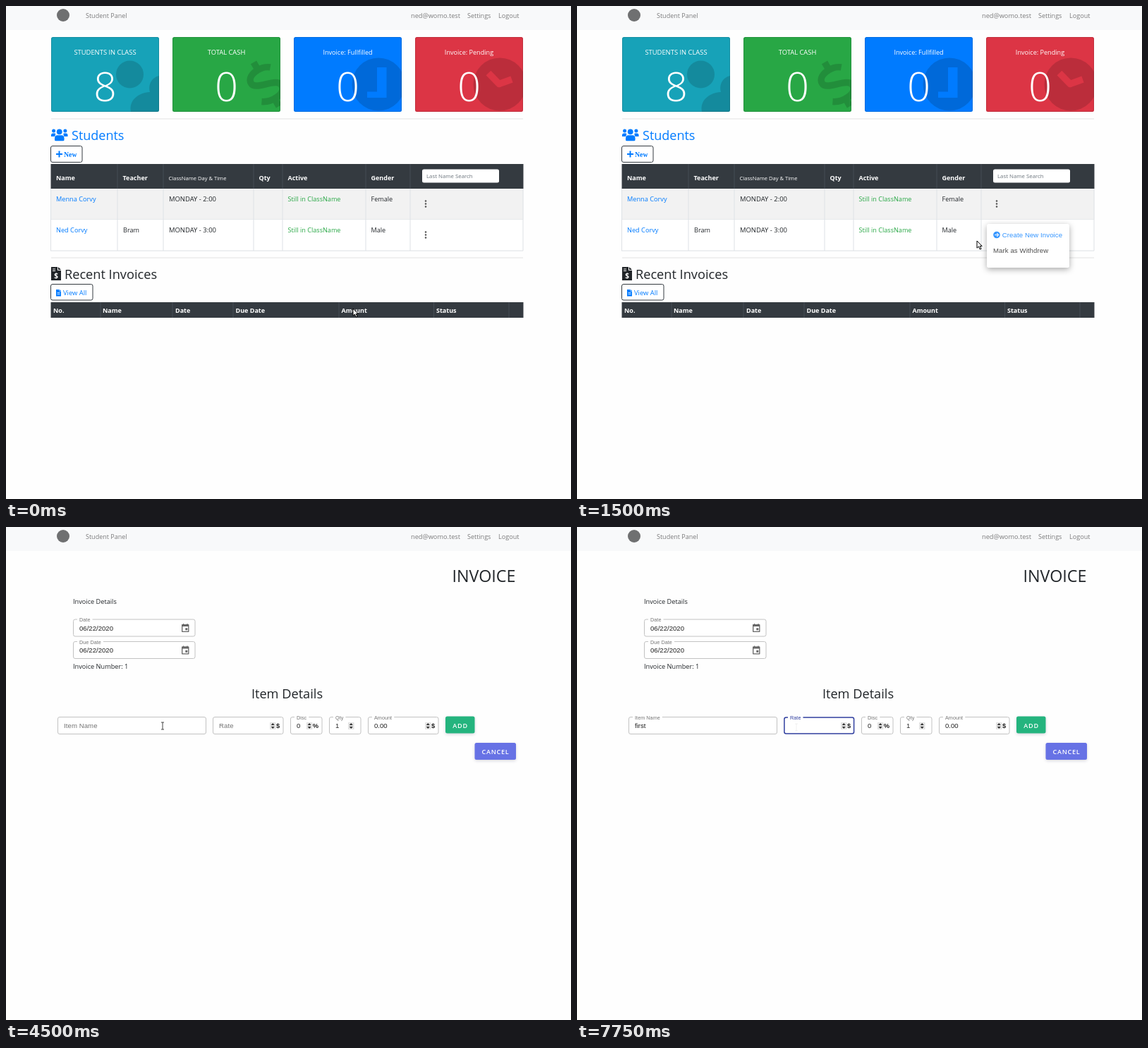
Write an HTML page with a canvas that moves like this. It is 801 px wide and 699 px high and loops after 8 s.

```html
<!DOCTYPE html>
<html lang="en">
<head>
<meta charset="utf-8">
<title>Student Panel</title>
<style>
html, body { margin: 0; width: 100%; height: 100%; overflow: hidden; background: #fff; }
canvas { display: block; width: 801px; height: 699px; }
</style>
</head>
<body>
<canvas id="stage" width="801" height="699"></canvas>
<script>
const ctx = document.getElementById('stage').getContext('2d');
const LOOP = 8000, STEP = 250;
const UI = '"Open Sans", "Noto Sans", sans-serif';
const ARIAL = '"Liberation Sans", Arial, sans-serif';
const SERIF = '"Liberation Serif", Times, serif';
const BLUE = '#007bff', DARK = '#343a40', INK = '#212529', GREEN = '#28a745', INDIGO = '#303f9f';

// [ms, x, y, shape]; each pose holds until the next one
const POINTER = [
  [0, 492, 429, 'arrow'], [250, 536, 376, 'arrow'], [500, 563, 327, 'arrow'],
  [750, 583, 324, 'arrow'], [1000, 594, 323, 'hand'], [1500, 567, 333, 'arrow'],
  [1750, 553, 350, 'arrow'], [2000, 546, 366, 'arrow'], [2250, 600, 352, 'arrow'],
  [2500, 640, 340, 'hand'], [2750, 644, 326, 'hand'], [3750, 440, 336, 'arrow'],
  [4000, 372, 312, 'arrow'], [4250, 278, 288, 'beam'], [4500, 222, 282, 'beam'],
  [4750, 222, 282, 'faint'], [6250, 262, 304, 'arrow'], [6500, 372, 316, 'arrow'],
  [6750, 449, 322, 'arrow'], [7000, 345, 290, 'beam'], [7250, 311, 284, 'faint']
];
const TYPED = [[5250, 'f'], [5500, 'fi'], [5750, 'firs'], [6000, 'first']];

const latest = (list, t) => list.filter(k => k[0] <= t).pop();

function text(s, x, y, size, color, { weight = 400, font = UI, align = 'left', gap = 0 } = {}) {
  ctx.font = `${weight} ${size}px ${font}`;
  ctx.textAlign = align;
  ctx.letterSpacing = gap + 'px';
  ctx.fillStyle = color;
  ctx.fillText(s, x, y);
  return ctx.measureText(s).width;
}
function rect(x, y, w, h, color) {
  ctx.fillStyle = color;
  ctx.fillRect(x, y, w, h);
}
function roundRect(x, y, w, h, r, fill, stroke, width = 1) {
  ctx.beginPath();
  ctx.roundRect(x, y, w, h, r);
  if (fill) { ctx.fillStyle = fill; ctx.fill(); }
  if (stroke) { ctx.strokeStyle = stroke; ctx.lineWidth = width; ctx.stroke(); }
}
function disc(x, y, r, color) {
  ctx.beginPath();
  ctx.arc(x, y, r, 0, 7);
  ctx.fillStyle = color;
  ctx.fill();
}
function shape(d, fill, stroke, width = 1) {
  const p = new Path2D(d);
  if (fill) { ctx.fillStyle = fill; ctx.fill(p); }
  if (stroke) { ctx.strokeStyle = stroke; ctx.lineWidth = width; ctx.stroke(p); }
}
function shadowed(color, blur, dy, draw) {
  ctx.save();
  ctx.shadowColor = color;
  ctx.shadowBlur = blur;
  ctx.shadowOffsetY = dy;
  draw();
  ctx.restore();
}

function nav() {
  rect(0, 0, 801, 34, '#f8f9fa');
  disc(81, 13, 9, '#6f7071');
  const grey = '#7c7c7d';
  text('Student Panel', 113, 17, 9, grey);
  text('ned@womo.test', 574, 17, 9.2, grey);
  text('Settings', 654, 17, 9, grey);
  text('Logout', 698, 17, 9.1, grey);
}

const SHADE = 'rgba(0,0,0,.15)';
const cardArt = [
  () => {
    disc(175.5, 97, 19.5, SHADE);
    shape('M217 99C207 101 201 111 204 122C187 123 174 134 177 150H217Z', SHADE);
  },
  () => {
    ctx.translate(369, 111);
    ctx.rotate(-Math.PI / 6);
    shape('M17-18C6-27-18-25-18-12C-18 1 18-2 18 12C18 26-6 26-18 18M0-36V-22M0 22V36', null, SHADE, 9.5);
  },
  color => {
    disc(528, 111, 37.5, SHADE);
    shape('M526 87H539.5V130H512V121.5H526Z', color);
  },
  color => {
    disc(700, 111, 37.5, SHADE);
    ctx.lineJoin = 'round';
    shape('M684 95L699 110.5L717 104', null, color, 9.5);
  }
];
function card(i, title, value, color, size) {
  const x = 64 + 172 * i;
  roundRect(x, 44, 153, 106, 2.5, color);
  ctx.save();
  ctx.clip();
  cardArt[i](color);
  ctx.restore();
  roundRect(x + .5, 44.5, 152, 105, 2.5, null, 'rgba(0,0,0,.12)');
  text(title, x + 76.5, 68.5, size, '#fff', { align: 'center' });
  text(value, x + 76.5, 135, 57, '#fff', { align: 'center', weight: 300 });
}

function usersIcon() {
  for (const x of [67.6, 83.9]) disc(x, 177, 2.5, BLUE);
  disc(75.7, 178.3, 3.9, BLUE);
  shape('M64 185V183Q64 180.5 66.5 180.5H69.5Q71 181 69 185ZM87.5 185V183Q87.5 180.5 85 180.5H82Q80.5 181 82.5 185Z', BLUE);
  roundRect(69, 183.3, 13.5, 8, [4, 4, 1.5, 1.5], BLUE);
}
function billIcon() {
  shape('M64 370H73V375H78V389H64ZM74 370L78 374H74Z', INK);
  rect(66, 372.5, 4, 1, '#fff');
  rect(66, 375, 4, 1, '#fff');
  text('$', 71, 386, 10, '#fff', { weight: 700, align: 'center' });
}
function fileIcon() {
  shape('M71 402H75.5V404.5H78V411.5H71ZM76 402L78 404H76Z', BLUE);
  for (const y of [406, 408]) rect(72.5, y, 4, .8, '#fff');
}

const HEAD = { weight: 700 };
function headRow(y, h, base, labels, lines) {
  rect(63.5, y, 670, h, DARK);
  for (const x of lines) rect(x, y, 1, h, '#454d55');
  for (const [s, x] of labels) text(s, x, base, 9, '#fff', HEAD);
}
const COLS = [157.5, 222.5, 350.5, 391.5, 509.5, 572.5];
function studentRow(y, bg, name, teacher, slot, gender) {
  rect(63.5, y, 670, 44, bg);
  for (const x of [63, ...COLS, 732.5]) rect(x, y, 1, 44, '#dee2e6');
  rect(63, y + 43.5, 670, 1, '#dee2e6');
  const b = y + 18;
  text(name, 71, b, 9.2, BLUE);
  text(teacher, 166, b, 9.1, INK);
  text(slot, 231, b, 9.45, INK);
  text('Still in ClassName', 399.5, b, 9.1, GREEN);
  text(gender, 517.5, b, 9.1, INK);
  for (const d of [-4, 0, 4]) disc(595, y + 21.5 + d, 1.25, '#555');
}

function menu(alpha, hover) {
  ctx.save();
  shadowed(`rgba(0,0,0,${.42 * alpha})`, 8, 2.5, () => roundRect(581, 309, 117, 62, 2.5, '#fff'));
  ctx.globalAlpha = alpha;
  const link = hover ? '#0056b3' : BLUE;
  const opt = { font: ARIAL, gap: .09 };
  disc(595, 324.5, 4.8, link);
  shape('M592.2 324.5H597.3M595.2 322L597.7 324.5L595.2 327', null, '#fff', 1.3);
  text('Create New Invoice', 602.8, 328, 9.6, link, opt);
  if (hover) rect(600, 329, 88.5, .8, link);
  text('Mark as Withdrew', 590, 350, 9.6, 'rgba(0,0,0,.87)', opt);
  ctx.restore();
}

function dashboard(t) {
  card(0, 'STUDENTS IN CLASS', '8', '#17a2b8', 9.4);
  card(1, 'TOTAL CASH', '0', GREEN, 9.4);
  card(2, 'Invoice: Fullfilled', '0', BLUE, 9.1);
  card(3, 'Invoice: Pending', '0', '#dc3545', 9.1);
  for (const y of [159.5, 356.5]) rect(64, y, 669, 1, '#e3e3e3');

  usersIcon();
  text('Students', 93, 190, 18, BLUE);
  roundRect(63.5, 198.5, 44.5, 23, 2.5, '#fff', DARK);
  shape('M71 210H80M75.5 205.5V214.5', null, BLUE, 2);
  text('New', 82, 213.5, 9.8, BLUE, { weight: 700, font: SERIF });

  headRow(224, 35, 247, [['Name', 71], ['Teacher', 165.5], ['Qty', 358.5], ['Active', 399.5], ['Gender', 517.5]], COLS);
  text('ClassName Day & Time', 230.5, 247, 7.6, '#fff');
  roundRect(590, 231.5, 109, 19, 2.5, '#fff');
  text('Last Name Search', 596, 244, 7.85, '#6c757d');
  const hover = t >= 500 && t < 1500;
  studentRow(259, '#f2f2f2', 'Menna Corvy', '', 'MONDAY - 2:00', 'Female');
  studentRow(303, hover ? '#ececec' : '#fff', 'Ned Corvy', 'Bram', 'MONDAY - 3:00', 'Male');

  billIcon();
  text('Recent Invoices', 83, 386.5, 18.2, INK);
  roundRect(63.5, 394.5, 59.5, 22.5, 2.5, '#fff', DARK);
  fileIcon();
  text('View All', 81, 410, 9.4, BLUE);
  headRow(420, 22, 435, [['No.', 67], ['Name', 137], ['Date', 240], ['Due Date', 325.5], ['Amount', 475.5], ['Status', 610]],
    [133.5, 235.5, 321.5, 471.5, 606, 712.5]);

  if (t >= 1500) menu(t < 1750 ? .8 : 1, t >= 2750);
}

// Outlined input; `rise` moves the label from inside (0) to the border (1)
function field(x, y, w, label, value, { rise = 1, focus = false, caret = false, spin = false, unit = '' } = {}) {
  const base = y + 15.5;
  if (focus) roundRect(x + .4, y + .4, w - .8, 23.2, 2.5, '#fff', INDIGO, 1.5);
  else roundRect(x, y, w, 24, 2.5, '#fff', '#c2c2c2');
  ctx.font = `7.2px ${ARIAL}`;
  ctx.letterSpacing = '0.07px';
  if (rise) rect(x + 5.5, y - 1.5, (ctx.measureText(label).width + 6) * rise, 3.2, '#fff');
  text(label, x + 8.5, base - 12.5 * rise, 9.6 - 2.4 * rise, focus ? INDIGO : '#757575', { font: ARIAL, gap: .07 });
  const wide = text(value, x + 8.5, base, 9.6, 'rgba(0,0,0,.87)', { font: ARIAL });
  if (caret) rect(x + 8.5 + wide, y + 6.5, 1, 11, '#333');

  let right = x + w - 9;
  if (unit) {
    const edge = x + w - 4.8;
    right = edge - text(unit, edge, base, 9.4, '#222', { weight: 700, font: ARIAL, align: 'right' });
  }
  if (spin) {
    rect(right - 9, y + 7.5, 8.5, 10, '#e4e4e4');
    const m = right - 4.75, c = y + 12.5;
    shape(`M${m - 2.5} ${c - 1}h5l-2.5-3zM${m - 2.5} ${c + 1}h5l-2.5 3z`, '#333');
  }
}
function dateField(y, label) {
  field(95.5, y, 172.5, label, '06/22/2020');
  ctx.save();
  ctx.translate(249, y + 6);
  ctx.lineJoin = 'round';
  shape('M.7 1.7H9.8V11.3H.7Z', null, '#666', 1.3);
  rect(.5, 1.2, 9.5, 2.8, '#666');
  rect(2, 0, 1.2, 2, '#666');
  rect(7.3, 0, 1.2, 2, '#666');
  rect(5.3, 6.3, 3, 3, '#666');
  ctx.restore();
}
function button(x, y, w, label, color) {
  shadowed('rgba(50,50,93,.2)', 4, 1.5, () => roundRect(x, y, w, 24, 2.5, color));
  text(label, x + w / 2 + .3, y + 16.2, 9.1, '#fff', { weight: 600, align: 'center', gap: .7 });
}
const riseAt = (t, start) => t < start ? 0 : t < start + STEP ? .35 : 1;

function invoice(t) {
  text('INVOICE', 632.5, 78, 23.3, INK);
  text('Invoice Details', 95, 108.5, 9.2, INK);
  dateField(131, 'Date');
  dateField(162.5, 'Due Date');
  text('Invoice Number: 1', 95, 200.5, 9.2, INK);
  text('Item Details', 398.5, 242.5, 18.2, INK, { align: 'center' });

  const y = 269.5, onItem = t >= 4750 && t < 7250, onRate = t >= 7250;
  const typed = latest(TYPED, t);
  field(73.5, y, 210, 'Item Name', typed ? typed[1] : '',
    { rise: riseAt(t, 4750), focus: onItem, caret: t >= 5000 && t < 7250 });
  field(293.5, y, 99.5, 'Rate', '',
    { rise: riseAt(t, 7250), focus: onRate, caret: t >= 7500 && t < 7750, spin: true, unit: '$' });
  field(403.5, y, 44.5, 'Disc', '0', { spin: true, unit: '%' });
  field(458.5, y, 44.5, 'Qty', '1', { spin: true });
  field(513.5, y, 99.5, 'Amount', '0.00', { spin: true, unit: '$' });

  button(623, 268.5, 41.5, 'ADD', '#24b47e');
  button(664.5, 306, 58.5, 'CANCEL', '#6772e5');
}

function pointer(t) {
  const [, x, y, kind] = latest(POINTER, t);
  ctx.save();
  ctx.translate(x, y);
  ctx.lineJoin = 'round';
  if (kind === 'arrow') {
    shape('M0 0V10.2L2.4 8L4.2 12L6 11.2L4.2 7.4H7.2Z', '#fff', '#000', 1);
  } else if (kind === 'hand') {
    shape('M-1 0Q0-1 1 0V5L7 6.2Q8.5 7 8 9L7 13H0L-4 8Q-4 6-1 8Z', '#fff', '#000', 1);
    shape('M3 6V8M5 6.5V8.5', null, '#000', .7);
  } else {
    const color = kind === 'beam' ? '#444' : 'rgba(0,0,0,.06)';
    shape('M-2-5H2M0-5V5M-2 5H2', null, color, 1);
  }
  ctx.restore();
}

function draw(now) {
  const t = Math.floor(now % LOOP / STEP) * STEP;
  rect(0, 0, 801, 699, '#fefefe');
  nav();
  (t < 3750 ? dashboard : invoice)(t);
  pointer(t);
}

const start = performance.now();
function frame() {
  draw(performance.now() - start);
  requestAnimationFrame(frame);
}
frame();
</script>
</body>
</html>
```
